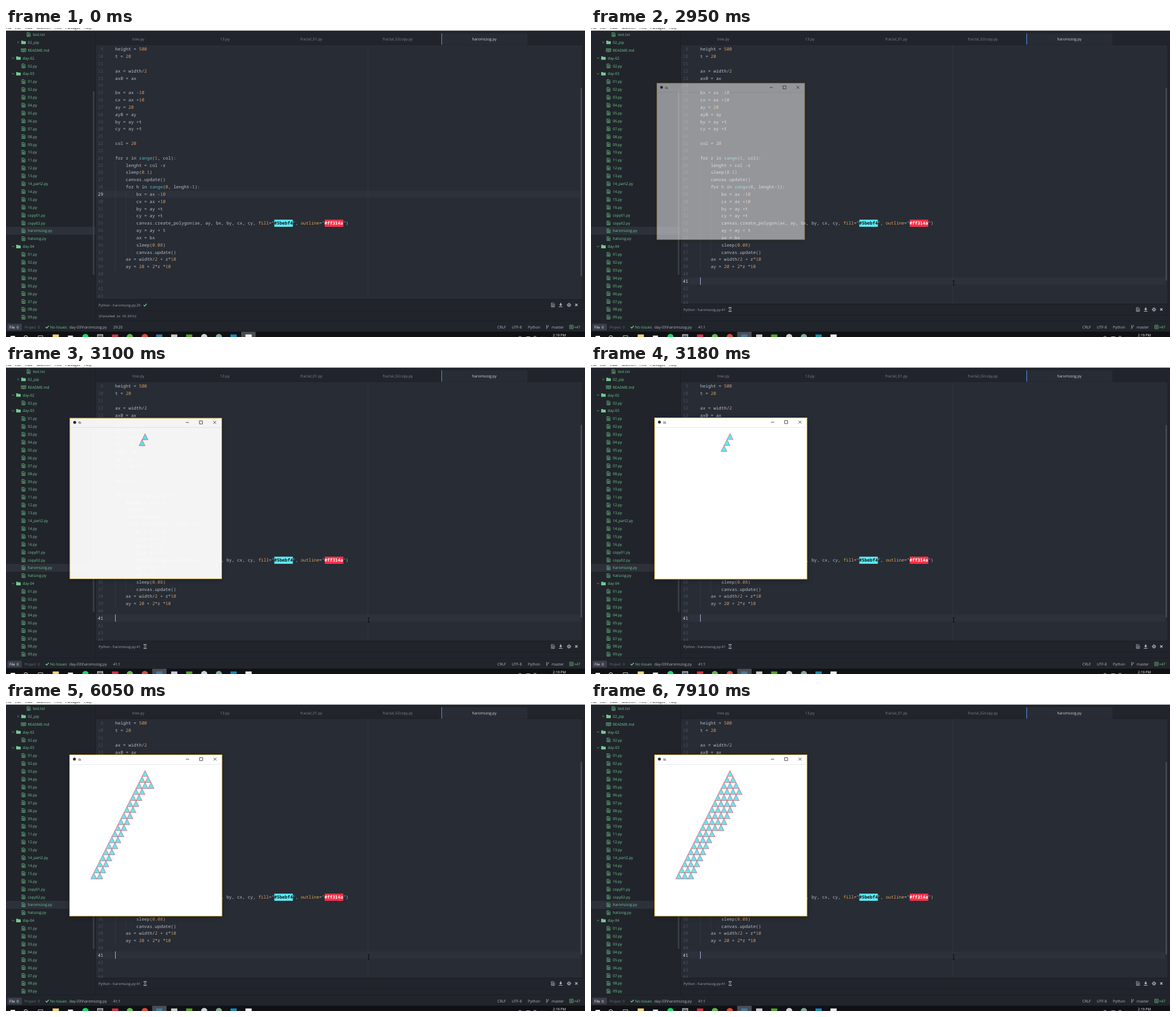
Recreate the animation shown at these times as an HTML page. Size 1024 by 547 pixels, loop 7.99 s.

```html
<!DOCTYPE html>
<html lang="en">
<head>
<meta charset="utf-8">
<title>Triangle script in an editor</title>
<style>
  html, body { margin: 0; width: 100%; height: 100%; overflow: hidden; background: #21252b; }
  svg { display: block; width: 1024px; height: 547px; }
  text { white-space: pre; text-rendering: geometricPrecision; font-family: "Open Sans", "Noto Sans", sans-serif; font-size: 6.6px; fill: #9da5b4; }
  .code text { font-family: "Noto Sans Mono", "DejaVu Sans Mono", monospace; font-size: 7.82px; fill: #b4bac6; }
  .code .num { fill: #495162; }
  .code .now { fill: #d7dae0; }
  .tree { color: #73c990; }
  .tree text { fill: currentColor; }
  .line { fill: none; stroke: currentColor; stroke-width: .8; }
  #tk { transform-origin: 247px 236px; filter: drop-shadow(0 2px 4px rgba(0, 0, 0, .3)); }
</style>
</head>
<body>
<svg id="stage" viewBox="0 0 1024 547"></svg>
<script>
const LOOP = 7990, ROW = 12.83, CHAR = 4.692, CODE_X = 193;
const lineY = n => 37.6 + (n - 9) * ROW;

const rect = (x, y, w, h, fill, more = '') =>
  `<rect x="${x}" y="${y}" width="${w}" height="${h}" fill="${fill}" ${more}/>`;
const label = (x, y, str, more = '') => `<text x="${x}" y="${y + 2.4}" ${more}>${str}</text>`;
const path = (d, more = 'class="line"') => `<path d="${d}" ${more}/>`;
const at = (x, y, content) => `<g transform="translate(${x} ${y})">${content}</g>`;

// Icons are centred on 0,0
const icon = {
  file: path('M-2.8-3.4H1L2.8-1.6V3.4H-2.8ZM-1.5-.9H1.4M-1.5.6H1.4M-1.5 2H1.4'),
  folder: path('M-4-3H-.6V-2H4V3.1H-4Z', 'fill="currentColor"'),
  book: path('M0-2.2L-4-2.8V2.2L0 2.8L4 2.2V-2.8ZM0-2.2V2.8M-2.8-1H-1M-2.8.6H-1M1-1H2.8M1 .6H2.8'),
  open: path('M-1.8-.9L0 .9L1.8-.9'),
  shut: path('M-.9-1.8L.9 0L-.9 1.8'),
  check: path('M-2.7.1L-.8 2L2.8-2', 'class="line" style="stroke-width:1.4"'),
  glass: path('M-2.7-3.5H2.7M-2.7 3.5H2.7M-1.9-3.4C-1.9-1-.5-.8-.5 0S-1.9 1-1.9 3.4H1.9C1.9 1 .5.8.5 0S1.9-1 1.9-3.4Z'),
  down: path('M-.9-3.6H.9V-1H2.8L0 1.9L-2.8-1H-.9ZM-3.2 2.7H3.2V3.8H-3.2Z', 'fill="currentColor"'),
  burst: path('M0-3.8V-1M0 1V3.8M-3.8 0H-1M1 0H3.8M-2.5-2.5L-1-1M1 1L2.5 2.5M2.5-2.5L1-1M-1 1L-2.5 2.5', 'class="line" style="stroke-width:1.2"'),
  cross: path('M-2-2L2 2M2-2L-2 2', 'class="line" style="stroke-width:1.3"'),
  branch: path('M-1.5-2.3V2.3M1.6-1.8C1.6.7-1.5-.2-1.5 1.7M-2.3-2.6H-.7M-2.3 2.8H-.7M.8-2.3H2.4'),
  plus: path('M-3-3H3V3H-3ZM-1.6 0H1.6M0-1.6V1.6')
};

const files = list => list.split(' ').map(name => ['file', 1, name]);
const span = (a, b) => Array.from({ length: b - a + 1 }, (_, i) => String(a + i).padStart(2, '0') + '.py').join(' ');

function tree() {
  const rows = [
    ['file', 2, 'test.txt'], ['shut', 1, '02_pip'], ['book', 1, 'README.md'],
    ['open', 0, 'day-02'], ...files('02.py'),
    ['open', 0, 'day-03'], ...files(span(1, 13)),
    ...files('14_part2.py 14.py 15.py 16.py copy01.py copy02.py haromszog.py hatszog.py'),
    ['open', 0, 'day-04'], ...files(span(1, 9))
  ];
  return rows.map(([kind, depth, name], i) => {
    const x = 22 + depth * 9, y = 11.5 + i * 13.9;
    const isFolder = kind === 'open' || kind === 'shut';
    return (name === 'haromszog.py' ? rect(0, y - 7, 158, 13.9, '#2c313a') : '') +
      (isFolder ? at(x - 9.5, y, icon[kind]) : '') +
      at(x, y, icon[isFolder ? 'folder' : kind]) + label(x + 7.4, y, name);
  }).join('');
}

const source = `height = 500
t = 20

ax = width/2
ax0 = ax

bx = ax -10
cx = ax +10
ay = 20
ay0 = ay
by = ay +t
cy = ay +t

col = 20

for r in range(1, col):
    lenght = col -r
    sleep(0.1)
    canvas.update()
    for h in range(0, lenght-1):
        bx = ax -10
        cx = ax +10
        by = ay +t
        cy = ay +t
        canvas.create_polygon(ax, ay, bx, by, cx, cy, fill="#5bebf4", outline="#ff314a")
        ay = ay + t
        ax = bx
        sleep(0.08)
        canvas.update()
    ax = width/2 + r*10
    ay = 20 + 2*r *10`.split('\n');

const paint = (str, color, more = '') => `<tspan fill="${color}" ${more}>${str}</tspan>`;
const highlight = str => str.replace(/(#\w{6})|\b(range)\b|\b(fill|outline)\b|\b(\d[\d.]*)\b/g,
  (all, hex, fn, arg) =>
    hex ? paint(all, hex === '#ff314a' ? '#fff' : '#101418', 'font-weight="600"') :
    paint(all, fn ? '#56b6c2' : arg ? '#d9a355' : '#d19a66'));

function code() {
  let out = '';
  for (let n = 9; n <= 44; n++)
    out += `<text id="n${n}" class="num" x="${n < 10 ? 167.3 : 162.6}" y="${lineY(n) + 2.7}">${n}</text>`;
  source.forEach((str, i) => {
    const y = lineY(i + 9), indent = str.search(/\S/);
    if (indent < 0) return;
    for (let g = 0; g < indent; g += 4)
      out += rect(CODE_X + g * CHAR, y - ROW / 2, .6, ROW, '#3b4049');
    for (const hex of str.match(/#\w{6}/g) || [])
      out += rect(CODE_X + str.indexOf(hex) * CHAR, y - 6.2, 7 * CHAR, 12.6, hex);
    out += `<text x="${CODE_X + indent * CHAR}" y="${y + 2.7}">${highlight(str.trim())}</text>`;
  });
  return out;
}

function tabs() {
  const names = ['tree.py', '13.py', 'fractal_01.py', 'fractal_02copy.py', 'haromszog.py'];
  return rect(159, 4.5, 865, 25, '#21252b') + rect(159, 29, 861, .6, '#181a1f') +
    rect(770, 9.5, 152, 20.2, '#282c34') + rect(770, 9.5, 1.1, 20, '#568af2') +
    names.map((name, i) => label(234 + i * 153, 19.5, name,
      `text-anchor="middle" style="fill:${i === 4 ? '#d7dae0' : '#7c8492'}"`)).join('');
}

const panel = () => `<g id="panel" color="#b4bac6">` +
  rect(159, 480, 861, 60, '#21252b') + rect(159, 480, 861, .7, '#181a1f') + rect(159, 500, 861, .7, '#1a1c21') +
  `<text id="job" x="163.5" y="492.8" style="font-size:6.15px"></text>` +
  `<g id="done" color="#73c990">${at(246, 490.3, icon.check)}</g>` +
  `<g id="busy">${at(246, 490.3, icon.glass)}</g>` +
  ['file', 'down', 'burst', 'cross'].map((k, i) => at([967.3, 981, 995.7, 1008.7][i], 490.3, icon[k])).join('') +
  `<text id="result" x="163.5" y="511.8" style="font:5.35px 'Noto Sans Mono',monospace;fill:#b4bac6">[Finished in 19.257s]</text></g>`;

function statusBar() {
  const light = 'style="fill:#b4bac6"', green = 'style="fill:#73c990"';
  return rect(0, 518, 1024, 19.5, '#21252b') + rect(0, 518, 1024, .6, '#181a1f') +
    rect(2.5, 523.5, 25.5, 12, '#3a3f4b', 'rx="1"') +
    label(6, 529.5, 'File&#160; 0', 'style="fill:#fff;font-size:6.2px"') +
    label(33, 529.5, 'Project&#160; 0', 'style="fill:#6b7280;font-size:6.2px"') +
    `<g color="#73c990">${at(72.8, 529.2, icon.check)}${at(1000, 529.2, icon.plus)}</g>` +
    label(78, 529.2, 'No Issues', green) + label(112, 529.2, 'day-03\\haromszog.py', light) +
    label(189.5, 529.2, '', 'id="pos" style="fill:#b4bac6"') +
    label(869, 529.2, 'CRLF', light) + label(894.5, 529.2, 'UTF-8', light) + label(923, 529.2, 'Python', light) +
    `<g color="#b4bac6">${at(957.8, 529.2, icon.branch)}</g>` + label(965, 529.2, 'master', light) +
    label(1004.5, 529.2, '+47', green);
}

function taskbar() {
  const dot = (x, fill) => `<circle cx="${x}" cy="547" r="5.5" fill="${fill}"/>`;
  const box = (x, fill) => rect(x - 5.5, 542.5, 11, 6, fill);
  return rect(0, 537.5, 1024, 10, '#0f1114') + rect(0, 537.8, 25.5, 10, '#4a4e53', 'id="active"') +
    rect(8, 545, 8, 4, '#fff') + '<circle cx="35" cy="548" r="3.4" fill="none" stroke="#fff"/>' +
    path('M57 547V544.8H65V547', 'fill="none" stroke="#ddd" stroke-width=".9"') +
    box(88, '#f2d27a') + rect(109.5, 544.5, 9, 4, '#eee') + dot(140.5, '#1ed760') +
    path('M162 547V542.8H171V547M163 545H170', 'fill="none" stroke="#fff" stroke-width="1.1"') +
    box(193, '#d9333f') + dot(219, '#62b746') + dot(245.5, '#dd4b39') + box(271, '#4479a8') +
    box(297.5, '#c9cbd0') + box(324, '#55a32a') + dot(350.5, '#d0d2d4') + dot(376.5, '#7cab8d') +
    box(402.5, '#1b87b8') + box(429, '#f0f0f0') +
    label(967, 544, '2:19 PM', 'style="fill:#fff;font-size:6.2px"') +
    label(945, 548.2, 'ENG', 'style="fill:#fff;font-size:5.8px"') +
    path('M906 547.5L909 545.5L912 547.5M920 546.5H927M933 546H938', 'fill="none" stroke="#ddd" stroke-width=".8"');
}

// Each row: first triangle, second triangle, then a steady step (ms)
const rows = [[3010, 3100, 77.5], [4570, 4644, 78], [6050, 6125, 77.3], [7440, 7518, 78]];
const UNIT = 10.667, triangles = [];

function tkWindow() {
  let shapes = '';
  rows.forEach(([first, second, step], r) => {
    for (let k = 0; k < 18 - r; k++) {
      const x = 245.9 + (r - k) * UNIT / 2, y = 121.2 + (r + k) * UNIT;
      triangles.push(k ? second + (k - 1) * step : first);
      shapes += path(`M${x} ${y}l${-UNIT / 2} ${UNIT}h${UNIT}Z`, 'class="tri" fill="#5bebf4" stroke="#ff314a" stroke-width=".65"');
    }
  });
  return '<g id="tk">' + rect(112.4, 93.5, 269.6, 285.5, '#fff', 'stroke="#e3b53c" stroke-width=".9"') +
    rect(113, 110, 268.5, .6, '#dcdcdc') + '<circle cx="121" cy="101" r="2.6" fill="#2b2b2b"/>' +
    label(127.5, 101.2, 'tk', 'style="fill:#111;font-size:6.1px"') +
    path('M318.2 101.2H323.8M342.4 98.4H347.8V103.8H342.4ZM367 98.5L372.2 103.7M372.2 98.5L367 103.7',
      'fill="none" stroke="#111" stroke-width=".75"') + shapes + '</g>';
}

document.getElementById('stage').innerHTML =
  rect(0, 0, 1024, 547, '#21252b') +
  `<g class="tree">${tree()}</g>` + rect(153.6, 112, 2.6, 325, '#3b4049', 'rx="1.2"') + rect(158.3, 5, .7, 513, '#181a1f') +
  rect(159, 29.6, 861, 490, '#282c34') + rect(159, 0, 857, ROW, '#2c313a', 'id="hot"') +
  `<g class="code">${code()}</g>` + rect(639.8, 29.6, .6, 490, '#383d46') +
  rect(193, 441.5, 1, 13, '#a9b8e8', 'id="caret"') +
  rect(1016.2, 106, 2.6, 334, '#454b57', 'id="thumb" rx="1.2"') + rect(1019.6, 29, .6, 490, '#181a1f') +
  tabs() + panel() + statusBar() + taskbar() +
  rect(0, 0, 1024, 4.6, '#fff') +
  ['File', 'Edit', 'View', 'Selection', 'Find', 'Packages', 'Help'].map((name, i) =>
    label([0, 16, 33.5, 53.5, 86, 105, 138][i], -.6, name, 'style="fill:#222;font-size:6.1px"')).join('') +
  path('M-1.6-4H1.6M0-4V4M-1.6 4H1.6', 'id="mouse" fill="none" stroke="#050607" stroke-width=".9"') + tkWindow();

const $ = id => document.getElementById(id);
const show = (el, on) => el.setAttribute('visibility', on ? 'visible' : 'hidden');
const latest = (steps, t) => steps.filter(s => s[0] <= t).pop();
const triEls = document.querySelectorAll('.tri');

const mouseSteps = [[290, 763, 484], [380, 710.5, 464.5], [620, 690, 459], [695, 661, 454], [770, 641.3, 451.3]];
const activeSteps = [[0, 416], [1000, 364], [2890, 258.5]];
const fadeSteps = [[2890, .25, .95], [2950, .5, .97], [3010, .745, .986], [3100, .95, .996], [3180, 1, 1]];

function draw(t) {
  const clicked = t >= 1320, running = t >= 2480;
  const mouse = latest(mouseSteps, t), fade = latest(fadeSteps, t);

  show($('mouse'), mouse);
  if (mouse) $('mouse').setAttribute('transform', `translate(${mouse[1]} ${mouse[2]})`);
  $('active').setAttribute('x', latest(activeSteps, t)[1]);

  $('hot').setAttribute('y', lineY(clicked ? 41 : 29) - ROW / 2);
  $('n29').setAttribute('class', clicked ? 'num' : 'now');
  $('n41').setAttribute('class', clicked ? 'now' : 'num');
  $('pos').textContent = clicked ? '41:1' : '29:20';
  show($('caret'), t >= 1780);

  $('panel').setAttribute('transform', `translate(0 ${running ? 8 : 0})`);
  $('job').textContent = 'Python - haromszog.py:' + (running ? 41 : 29);
  show($('done'), !running);
  show($('busy'), running);
  show($('result'), !running);
  $('thumb').setAttribute('height', running ? 341 : 334);

  $('tk').style.display = fade ? '' : 'none';
  if (fade) {
    $('tk').style.opacity = fade[1];
    $('tk').style.transform = `scale(${fade[2]})`;
  }
  triEls.forEach((el, i) => show(el, t >= triangles[i]));
}

const start = performance.now();
function tick() {
  draw((performance.now() - start) % LOOP);
  requestAnimationFrame(tick);
}
tick();
</script>
</body>
</html>
```
